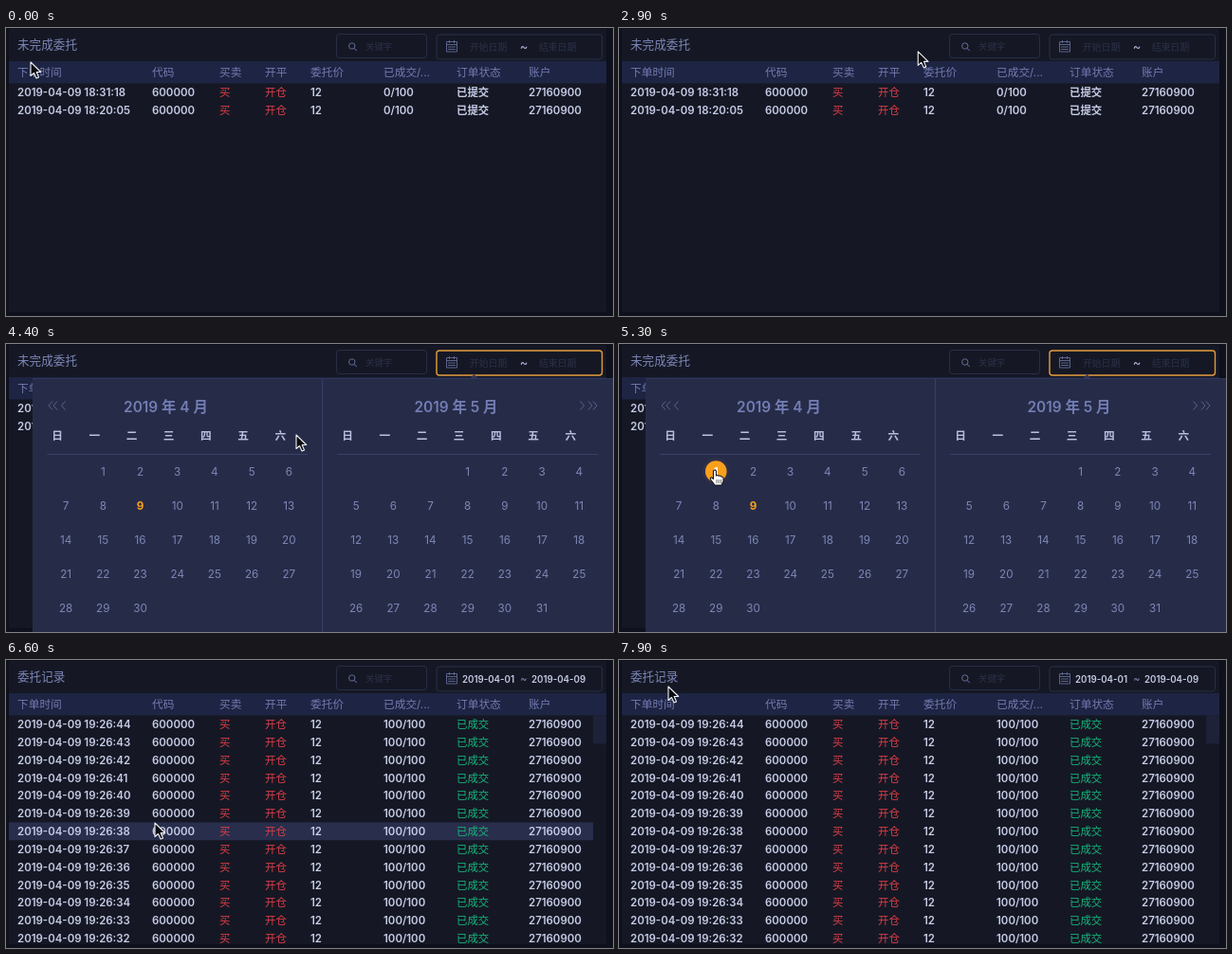
Animation of 640 by 304 pixels, one loop 8 s. Source, as an HTML page with a canvas:

```html
<!DOCTYPE html>
<html lang="zh-CN">
<head>
<meta charset="utf-8">
<style>
html, body { margin: 0; width: 100%; height: 100%; overflow: hidden; background: #0e101c; }
canvas { display: block; }
</style>
</head>
<body>
<canvas id="stage" width="640" height="304"></canvas>
<script>
const ctx = document.getElementById('stage').getContext('2d');
const LOOP = 8000, OPEN = 3868, PICK = 5300, CLOSE = 6300, LOADED = 6400;
const FAMILY = 'Inter, "Noto Sans CJK SC", "Noto Sans CJK", sans-serif';
const ORANGE = '#f9a01b', RED = '#dc3d48', GREEN = '#16b37a';
const PALE = '#c6cbe6', MUTED = '#717bb0', DIM = '#2b3049', EDGE = '#292e47';
const COLUMNS = [12, 154, 225, 273, 321, 398, 475, 551];
const HEADS = ['下单时间', '代码', '买卖', '开平', '委托价', '已成交/...', '订单状态', '账户'];
const ACCOUNT = '27160900';
const ROW_TOP = 58.4, ROW_H = 18.83;
const CELL_W = 39.2, CELL_H = 36, GRID_X = 43.5, GRID_Y = 117;

// time, x, y of the pointer tip
const PATH = [
  [0, 26, 36], [400, 24, 36], [1000, 14, 27], [1700, 69, 26], [2200, 70, 26],
  [3500, 509, 24], [3950, 509, 24], [4400, 306, 96], [4500, 304, 97],
  [5050, 101, 134], [5350, 101, 134], [5850, 140, 167], [6300, 140, 167],
  [6600, 157, 172], [6800, 157, 173], [7400, 38, 29], [7900, 52, 28], [8000, 53, 28]
];

const clamp = v => Math.max(0, Math.min(1, v));
const easeOut = t => 1 - (1 - clamp(t)) ** 5;
const smooth = t => t * t * (3 - 2 * t);

function pointerAt(t) {
  const i = PATH.findIndex(p => p[0] > t);
  const [t0, x0, y0] = PATH[i - 1], [t1, x1, y1] = PATH[i];
  const k = smooth((t - t0) / (t1 - t0));
  return { x: x0 + (x1 - x0) * k, y: y0 + (y1 - y0) * k };
}

function rect(x, y, w, h, color) {
  ctx.fillStyle = color;
  ctx.fillRect(x, y, w, h);
}

function text(s, x, y, size, color, weight = 400, align = 'left') {
  ctx.font = `${weight} ${size}px ${FAMILY}`;
  ctx.textAlign = align;
  ctx.textBaseline = 'alphabetic';
  ctx.fillStyle = color;
  ctx.fillText(s, x, y + size * 0.365);
}

function stroke(d, color, width = 1) {
  ctx.strokeStyle = color;
  ctx.lineWidth = width;
  ctx.stroke(new Path2D(d));
}

function disc(x, y, r, color) {
  ctx.fillStyle = color;
  ctx.beginPath();
  ctx.arc(x, y, r, 0, 7);
  ctx.fill();
}

function box(x, y, w, h, color, width = 1) {
  ctx.strokeStyle = color;
  ctx.lineWidth = width;
  ctx.beginPath();
  ctx.roundRect(x, y, w, h, 3);
  ctx.stroke();
}

function drawToolbar(loaded, focus) {
  text(loaded ? '委托记录' : '未完成委托', 12, 17.8, 12.6, '#7d86b8');
  box(348.5, 6.5, 95, 25, EDGE);
  stroke('M368 19a3.2 3.2 0 1 1-6.4 0a3.2 3.2 0 1 1 6.4 0M367 21.5l3 2.5', '#626b98');
  text('关键字', 379, 19.5, 9.4, DIM);

  box(454, 7, 174.5, 26, EDGE);
  if (focus) {
    ctx.globalAlpha = focus;
    box(454, 7, 174.5, 26, '#e49a38', 1.4);
    ctx.globalAlpha = 1;
  }
  stroke('M464.5 14.5h11v10.5h-11zM464.5 17.5h11M467.5 13v3M472.5 13v3M466 20h8M466 22.5h8', '#626b98', 0.9);
  if (loaded) {
    text('2019-04-01', 481, 20, 9.7, PALE, 600);
    text('~', 546, 20, 11, '#8088b0', 400, 'center');
    text('2019-04-09', 554, 20, 9.7, PALE, 600);
  } else {
    text('开始日期', 489, 20, 9.8, DIM);
    text('~', 546, 19.5, 13, '#a6acd0', 500, 'center');
    text('结束日期', 562, 20, 9.8, DIM);
  }
}

function drawTable(loaded, hover) {
  rect(3, 35, 630, 23.4, '#1e2443');
  HEADS.forEach((s, i) => text(s, COLUMNS[i], 47, 11.7, MUTED));
  const count = loaded ? 13 : 2;
  for (let i = 0; i < count; i++) {
    const top = ROW_TOP + i * ROW_H;
    if (i === hover) rect(3, top, loaded ? 616 : 630, ROW_H, '#282e4c');
    const time = loaded ? '19:26:' + (44 - i) : ['18:31:18', '18:20:05'][i];
    const cells = ['2019-04-09 ' + time, '600000', '买', '开仓', '12',
      loaded ? '100/100' : '0/100', loaded ? '已成交' : '已提交', ACCOUNT];
    cells.forEach((s, c) => {
      const red = c === 2 || c === 3, green = loaded && c === 6;
      text(s, COLUMNS[c], top + 9.6, 11.45, red ? RED : green ? GREEN : PALE, red || green ? 500 : 600);
    });
  }
  if (loaded) rect(619, 58.4, 14, 30, '#1d2239');
}

function dayAt(p) {
  const c = Math.floor((p.x - GRID_X) / CELL_W), r = Math.floor((p.y - GRID_Y) / CELL_H);
  const day = r * 7 + c;
  return c >= 0 && c < 7 && r >= 0 && day >= 1 && day <= 30 ? day : 0;
}

function drawMonth(x, month, offset, days, range) {
  const dayX = i => x + CELL_W * (i % 7 + 0.5);
  const dayY = i => 134.6 + CELL_H * Math.floor(i / 7);
  text(`2019 年 ${month} 月`, x + 125, 66, 15.4, '#737db4', 600, 'center');
  [...'日一二三四五六'].forEach((s, i) => text(s, dayX(i) - 9, 97, 11.7, '#b9bfdf', 600, 'center'));
  rect(x, 116, 274.5, 1, '#3a4168');

  if (range) {
    for (let r = 0; r * 7 <= range; r++) {
      const first = Math.max(1, r * 7), last = Math.min(range, r * 7 + 6);
      const left = first === 1 ? dayX(1) : x;
      const right = last === range ? dayX(range) : x + CELL_W * 7;
      rect(left, dayY(first) - 14, right - left, 28, '#343a62');
    }
    for (const d of [1, range]) {
      disc(dayX(d), dayY(d), 14, '#302f49');
      disc(dayX(d), dayY(d), 11.3, ORANGE);
    }
  }
  for (let d = 1; d <= days; d++) {
    const i = d + offset - 1;
    const end = range && (d === 1 || d === range), today = month === 4 && d === 9;
    text(d, dayX(i), dayY(i), 11.7, end ? '#fff' : today ? ORANGE : '#7e87b6',
      end || today ? 700 : 400, 'center');
  }
}

function drawCalendar(shown, range) {
  ctx.save();
  ctx.globalAlpha = shown;
  ctx.translate(0, 36);
  ctx.scale(1, shown);
  ctx.translate(0, -36);
  rect(28, 36, 612, 306, '#262c48');
  ctx.fillStyle = '#30375a';
  ctx.fill(new Path2D('M489 36.5l4.5-4.5 4.5 4.5z'));
  rect(28, 36, 612, 1, '#303759');
  rect(333, 37, 1, 305, '#383f65');
  stroke('M49 60.5l-4 4.5 4 4.5M54 60.5l-4 4.5 4 4.5M62.5 60.5l-4 4.5 4 4.5', '#59628f');
  stroke('M605.5 60.5l4 4.5-4 4.5M614 60.5l4 4.5-4 4.5M619 60.5l4 4.5-4 4.5', '#59628f');
  drawMonth(GRID_X, 4, 1, 30, range);
  drawMonth(349.5, 5, 3, 31, 0);
  ctx.restore();
}

function drawPointer(p, kind) {
  ctx.save();
  ctx.translate(p.x, p.y);
  ctx.lineJoin = 'round';
  if (kind === 'beam') {
    const beam = 'M-3-9q3 0 3 2.5q0-2.5 3-2.5M0-7v16M-3 11q3 0 3-2.5q0 2.5 3 2.5M-2 4.5h4';
    stroke(beam, '#10121d', 2.4);
    stroke(beam, '#b4b7c4', 1);
  } else {
    const shape = new Path2D(kind === 'hand'
      ? 'M-1.5 0Q0-2 1.5 0V5Q3 3.8 4 5.3Q6 4.4 6.6 6Q9 5.6 9 8V11L7 15H0L-4 9.5Q-5.5 7-3.5 6.7L-1.5 8.5Z'
      : 'M0 0V14.5L3.5 11.5L6 17L8.5 16L6.2 10.5H10.7Z');
    ctx.fillStyle = kind === 'hand' ? '#fff' : '#0b0c12';
    ctx.strokeStyle = kind === 'hand' ? '#15161d' : '#f2f2f5';
    ctx.lineWidth = 1.1;
    ctx.fill(shape);
    ctx.stroke(shape);
    if (kind === 'hand') stroke('M2 9v4M4.2 9v4M6.4 9v4', '#333', 0.7);
  }
  ctx.restore();
}

function draw(t) {
  const p = pointerAt(t), loaded = t >= LOADED;
  const shown = t < CLOSE ? easeOut((t - OPEN) / 300) : 1 - easeOut((t - CLOSE) / 300);
  const open = t >= OPEN && t < CLOSE;
  const focus = t < CLOSE ? clamp((t - OPEN - 35) / 160) : 1 - clamp((t - CLOSE) / 160);
  const day = open ? dayAt(p) : 0;
  const hover = open ? -1 : Math.floor((p.y - ROW_TOP) / ROW_H);
  const range = t >= PICK ? (t >= CLOSE ? 9 : day || 1) : 0;

  rect(0, 0, 640, 304, '#0e101c');
  rect(3, 1, 630, 299, '#151824');
  drawTable(loaded, hover);
  drawToolbar(loaded, focus);
  if (shown > 0.01) drawCalendar(shown, range);
  const inField = p.x > 454 && p.y > 7 && p.y < 33;
  drawPointer(p, inField ? 'beam' : day ? 'hand' : 'arrow');
}

function tick() {
  draw(performance.now() % LOOP);
  requestAnimationFrame(tick);
}
tick();
</script>
</body>
</html>
```
